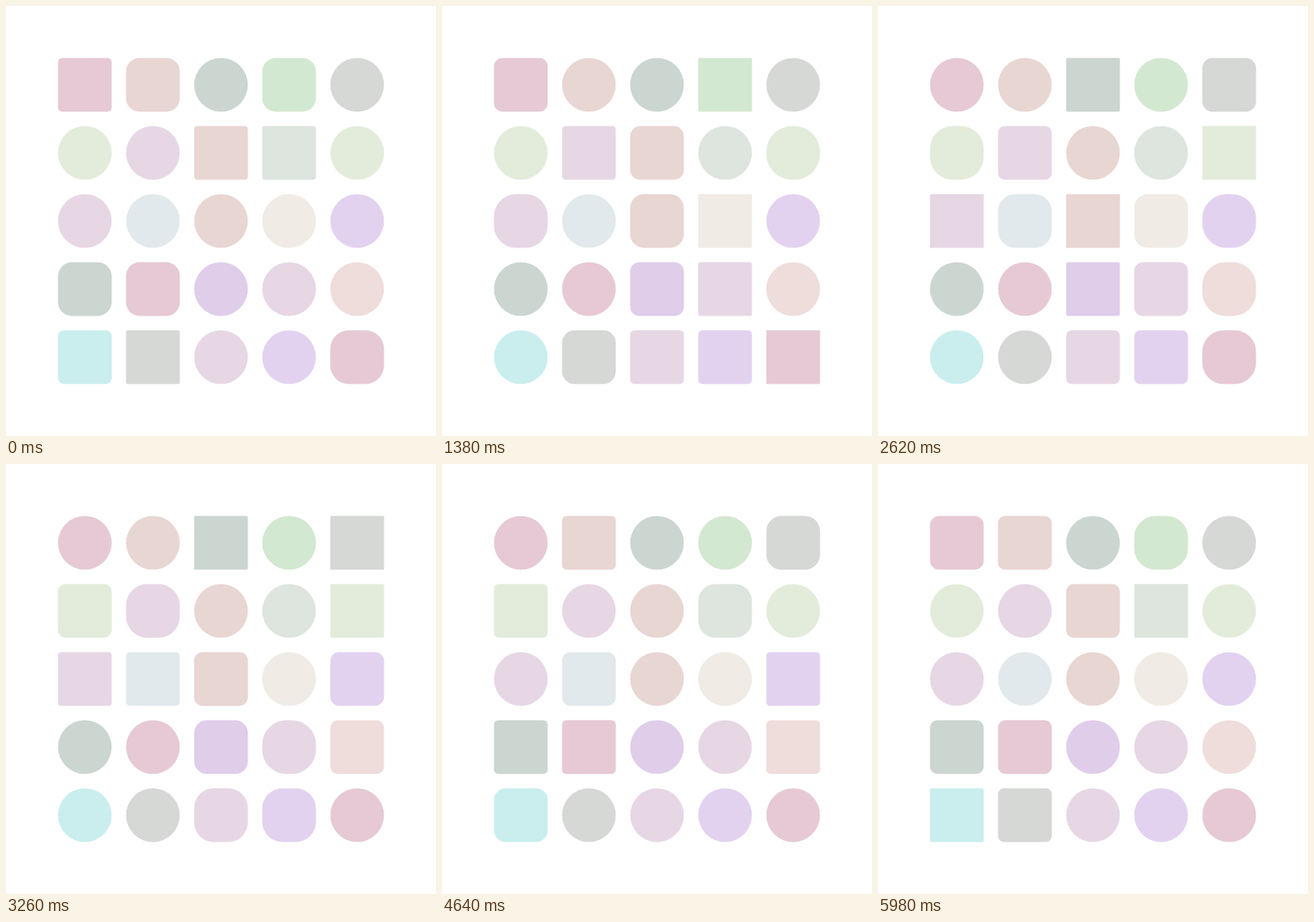
Recreate the animation shown at these times as an HTML page with a canvas. Size 600x600 px, loop 6000 ms.

```html
<!DOCTYPE html>
<html lang="en">
<head>
<meta charset="utf-8">
<title>Morphing grid</title>
<style>
  html, body { margin: 0; width: 100%; height: 100%; overflow: hidden; background: #fff; }
  canvas { display: block; }
</style>
</head>
<body>
<canvas id="stage" width="600" height="600"></canvas>
<script>
const LOOP = 6000, COLS = 5, PITCH = 95, START = 72.5, SIZE = 75;
const ctx = document.getElementById('stage').getContext('2d');

const palette = {
  rose: '#e6c9d5', blush: '#e8d6d3', sage: '#ccd6d1', mint: '#d3e8d0',
  gray: '#d6d8d5', lime: '#e3ecdb', mauve: '#e7d7e5', mist: '#dde5de',
  ice: '#e1e9ec', cream: '#f0ebe4', lilac: '#e2d2ef', violet: '#e0cdea',
  peach: '#efdddb', aqua: '#c9eeed'
};

const colors = `
  rose  blush sage   mint  gray
  lime  mauve blush  mist  lime
  mauve ice   blush  cream lilac
  sage  rose  violet mauve peach
  aqua  gray  mauve  lilac rose`.trim().split(/\s+/);

// Seconds at which each tile is a sharp square
const sharpAt = [
  0.56, 5.24, 2.95, 1.06, 3.52,
  4.04, 1.90, 0.48, 5.84, 2.91,
  2.78, 3.82, 2.45, 1.57, 4.10,
  5.21, 5.23, 2.24, 1.79, 4.05,
  5.61, 0.37, 1.96, 1.94, 1.26
];

function draw(seconds) {
  ctx.clearRect(0, 0, 600, 600);
  colors.forEach((name, i) => {
    const x = START + (i % COLS) * PITCH;
    const y = START + Math.floor(i / COLS) * PITCH;
    const wave = 1 - Math.cos(seconds - sharpAt[i]);
    const radius = SIZE / 2 * Math.min(1, wave);
    ctx.fillStyle = palette[name];
    ctx.beginPath();
    ctx.roundRect(x, y, SIZE, SIZE, radius);
    ctx.fill();
  });
}

const begin = performance.now();
function tick() {
  draw((performance.now() - begin) % LOOP / 1000);
  requestAnimationFrame(tick);
}
tick();
</script>
</body>
</html>
```
